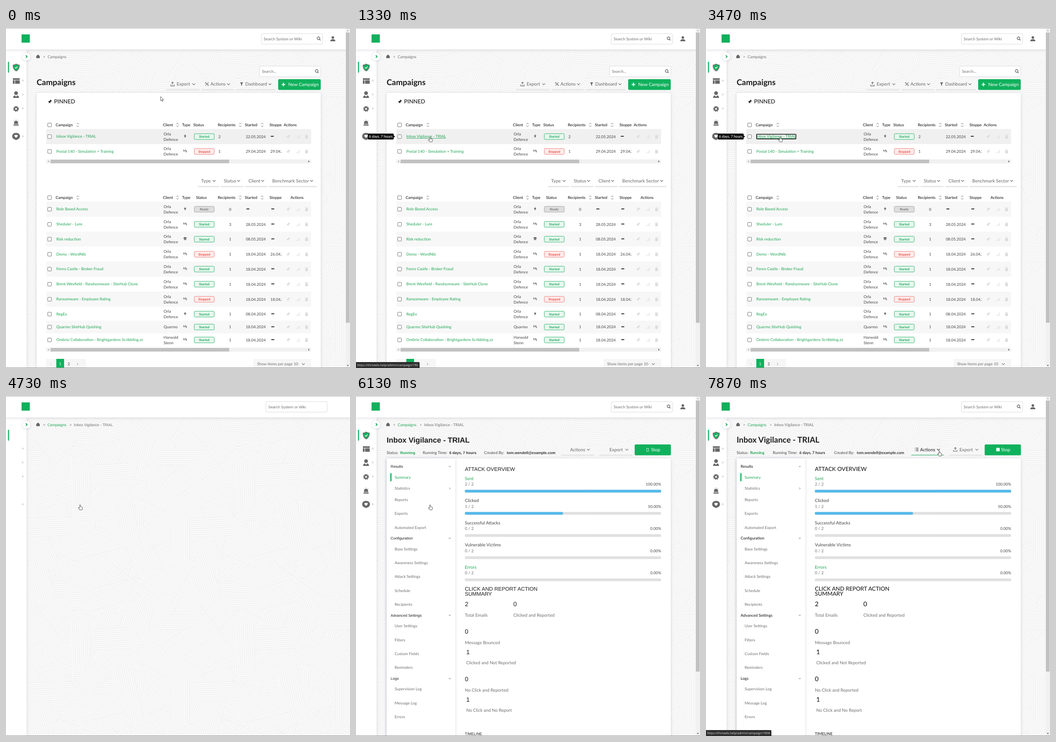
These frames come from a looping animation (752 px wide and 744 px high, 8000 ms). An HTML page with a canvas:

```html
<!DOCTYPE html>
<html lang="en">
<head>
<meta charset="utf-8">
<title>Campaigns</title>
<style>
html,body{margin:0;width:100%;height:100%;overflow:hidden;background:#f9f9f9}
canvas,svg{position:absolute;left:0;top:0;width:752px;height:744px;display:block}
text{font:8.55px Lato,sans-serif;fill:#444;text-rendering:geometricPrecision;white-space:pre}
.ln{fill:none;stroke:currentColor;stroke-width:1}
.m{font-weight:500;fill:#1c1c1c}
.h{font-size:17.5px;font-weight:700;fill:#1d1d1d}
.b{font-size:8.5px;font-weight:700;fill:#333}
.cap{font-size:12.3px;font-weight:500;fill:#1c1c1c}
.num{font-size:14px;font-weight:500;fill:#1c1c1c}
.t9{font-size:9.65px}
.t10{font-size:10px;fill:currentColor}
.tag{font-size:7px;font-weight:700}
.g{fill:#1da553}
.l{fill:#6e6e6e}
.w{fill:#fff}
.mid{text-anchor:middle}
.end{text-anchor:end}
.url{font:6.7px "Open Sans","Noto Sans",sans-serif;fill:#e3e3e3}
.raw .f{font:8.15px "Liberation Sans",Arial,sans-serif}
.half .m{font:8.15px "Liberation Sans",Arial,sans-serif}
.half .b{font:700 8.15px "Liberation Sans",Arial,sans-serif}
.half .h{font:700 16.3px "Liberation Sans",Arial,sans-serif}
.half .cap{font:11.6px "Liberation Sans",Arial,sans-serif}
.half .num{font:13.5px "Liberation Sans",Arial,sans-serif}
.sh{filter:drop-shadow(0 1px 3px rgba(40,40,90,.17))}
</style>
</head>
<body>
<canvas id="bg" width="752" height="744"></canvas>
<svg id="ui" viewBox="0 0 752 744"></svg>
<script>
const GREEN = '#10b15c', GREY = '#686868', NAME = 'Inbox Vigilance - TRIAL';
const $ = id => document.getElementById(id);

// Hatched paper, repeating every 360 px
function paper() {
  const c = $('bg').getContext('2d'), P = 360, cell = 40;
  let seed = 11;
  const rnd = () => (seed = seed * 16807 % 2147483647) / 2147483647;
  const list = [];
  for (let i = 0; i < 81; i++)
    list.push([(i * 4 % 9 + rnd()) * cell, ((i / 9 | 0) * 2 % 9 + rnd()) * cell, 90 + rnd() * 40, 44 + rnd() * 10, rnd() * 180]);
  list.push([25, 135, 95, 32, 0], [350, 225, 110, 50, 28], [165, 32, 120, 46, 22],
    [230, 75, 90, 45, -14], [30, 180, 90, 45, -32], [163, 190, 100, 40, 88],
    [20, 310, 100, 42, 90], [230, 172, 90, 46, -3], [95, 287, 95, 42, -2]);
  c.fillStyle = '#f9f9f9';
  c.fillRect(0, 0, 752, 744);
  c.strokeStyle = '#eee';
  for (const [x, y, w, h, a] of list)
    for (let ox = -P; ox < 1100; ox += P)
      for (let oy = -P; oy < 1100; oy += P) {
        c.save();
        c.translate(x + ox, y + oy);
        c.rotate(a * Math.PI / 180);
        c.fillRect(-w / 2, -h / 2, w, h);
        c.beginPath();
        for (let v = -h / 2; v <= h / 2; v += 4.5) { c.moveTo(-w / 2, v); c.lineTo(w / 2, v); }
        c.stroke();
        c.restore();
      }
}

const T = (x, y, s, cls = '', a = '') => `<text x="${x}" y="${y}" class="${cls}" ${a}>${s}</text>`;
const R = (x, y, w, h, fill, a = '') => `<rect x="${x}" y="${y}" width="${w}" height="${h}" fill="${fill}" ${a}/>`;
const S = (d, x, y, a = '') => `<path d="${d}" transform="translate(${x} ${y})" ${a}/>`;
const G = (id, s, a = '') => `<g id="${id}" ${a}>${s}</g>`;
const line = (d, x, y, col, w = 1) => S(d, x, y, `class="ln" style="color:${col};stroke-width:${w}"`);
const down = (x, y, col = 'currentColor', w = 1.1, k = 1) => line(`M${-3 * k} ${-1.5 * k}L0 ${1.5 * k} ${3 * k} ${-1.5 * k}`, x, y, col, w);
const right = (x, y, col = '#888') => line('M-1-2 1 0-1 2', x, y, col, .9);
const sort = (x, y) => line('M-2.5-1.5 0-4 2.5-1.5M-2.5 1.5 0 4 2.5 1.5', x, y, '#666', .9);
const box = y => R(91.2, y - 4, 8.2, 8.2, '#fff', 'rx="1" stroke="#666" stroke-width=".9"');
const lens = (x, y) => line('M2 2 4 4M2.6-.4A3-3 0 1 1 2.6-.6', x, y, '#555', 1.2);

const ICON = {
  out: 'M0 1.5V-4M-2.2-2 0-4.2 2.2-2M-4 1.2V4H4V1.2',
  tools: 'M-3.5-3.5 3.5 3.5M3.5-3.5-3.5 3.5M-4-1.5-2-3.8M2 3.8 4 1.8',
  list: 'M-4-3H-3M-1.5-3H4M-4 0H-3M-1.5 0H4M-4 3H-3M-1.5 3H4',
  funnel: 'M-3.5-3.5H3.5L1 0V4L-1 2.5V0Z',
  pin: 'M1-4.5 4.5-1 3.6-.4 2.8-.8 .9 1.2 .8 3 0 3.7-1.7 2-4.5 4.5-2 1.6-3.7 0-3-.8-1.2-.9 .8-2.8 .4-3.6Z',
  bars: 'M-4 2.5H-3V4H-4ZM-1.6 .8H-.6V4H-1.6ZM.8-1.2H1.8V4H.8ZM3.2-3.5H4.2V4H3.2Z',
  bin: 'M-3.5-3.5H-1L-.6-4.3H.6L1-3.5H3.5V-2.5H-3.5ZM-3-1.8H3V4.2H-3Z',
  bolt: 'M1-4.5-2.6 .8H-.3L-1 4.5 2.7-1H.4Z',
  hook: 'M-3-3V1H-.8M-4-1H3.8M1-3V.8H3.6V2.4H1.4',
  cap: 'M-4.6-1.6 0-3.6 4.6-1.6 0 .5ZM-2.6 .3V2.3Q0 3.8 2.6 2.3V.3L0 1.5Z',
  home: 'M0-4 3.8-.4V4H-3.8V-.4Z'
};

function btn(x, w, y, icon, ix, label, tx, cx) {
  const draw = !icon ? '' : icon === 'funnel' ? S(ICON.funnel, ix, y, 'fill="currentColor"')
    : line(ICON[icon], ix, y, 'currentColor', 1.1);
  return R(x, y + 12.4, w, 2, '#efefef') + R(x, y + 11.7, w, 1, 'var(--u,#d6d6d6)')
    + `<g class="ico">${draw}</g>` + T(tx, y + 3.6, label, 't10') + down(cx, y + .3);
}

const TAGS = {
  Started: ['#e7f7ee', '#35b873', '#1da55c'],
  Stopped: ['#fdeceb', '#f0827d', '#e5504a'],
  Ready: ['#dedede', '#a8a8a8', '#777']
};

function tag(y, s) {
  const [fill, edge, ink] = TAGS[s];
  return R(411.6, y - 6.2, 43.6, 12.6, fill, `rx="2" stroke="${edge}"`)
    + T(433.4, y + 2.5, s, 'tag mid', `style="fill:${ink}"`);
}

function row(y, name, kind, state, n, from, to, wide, bg, client = 'Orla Defence') {
  const words = client.split(' '), h = y > 640 ? 28 : 33;
  let s = bg ? R(88, y - h / 2, 579, h, bg) : '';
  s += box(y) + T(110, y + 2.8, name, 'g');
  s += words.length < 2 ? T(344.5, y + 3, client) : T(344.5, y - 3, words[0]) + T(344.5, y + 9, words[1]);
  s += kind === 'hook' ? line(ICON.hook, 391.5, y - 1, '#666', .9) : S(ICON[kind], 391.5, y - 1, 'fill="#555"');
  s += tag(y, state) + (wide ? T(490, y + 3, n, 'mid') : T(464.3, y + 3, n));
  s += from ? T(546, y + 3, from, 'mid') : R(525.5, y - 1.5, 6.5, 1.8, '#222');
  s += to ? T(578, y + 3, to, '', 'clip-path="url(#cut)"') : R(wide ? 580 : 578.8, y - 1.5, 6.5, 1.8, '#222');
  return s + ['pin', 'bars', 'bin'].map((k, i) => S(ICON[k], [617, 638, 657][i], y, 'fill="#dcdcdc"')).join('');
}

function head(y, st, act) {
  const cols = [[108.5, 'Campaign'], [343, 'Client'], [385, 'Type'], [st, 'Status'], [463, 'Recipients'], [522, 'Started'], [act, 'Actions']];
  return box(y) + cols.map(([x, s]) => T(x, y + 3, s, 'm')).join('')
    + T(576, y + 3, 'Stopped', 'm', 'clip-path="url(#cut)"')
    + [157, 375, 512, 560].map(x => sort(x, y)).join('');
}

const slider = y => R(88, y, 579, 9, '#f1f1f1') + R(97.5, y + .6, 390.5, 7.8, '#c1c1c1')
  + S('M1-2V2L-1.5 0Z', 93, y + 4.5, 'fill="#a3a3a3"') + S('M-1-2V2L1.5 0Z', 662, y + 4.5, 'fill="#444"');

function shell() {
  const side = S('M0-8Q4-5.6 7.6-5.6 8.4 4.5 0 9-8.4 4.5-7.6-5.6-4-5.6 0-8Z', 22.3, 86, 'fill="#777"')
    + S('M0-6.3Q3-4.4 6-4.3 6.4 3.8 0 7.2-6.4 3.8-6-4.3-3-4.4 0-6.3Z', 22.3, 86, `fill="${GREEN}"`)
    + line('M-2.8 0-.6 2.2 3-1.8', 22.3, 86, '#fff', 1.4)
    + S('M-7.5-6H7.5V-2.6H-7.5ZM-7.5-1.5H-3.7V6H-7.5ZM-2.6-1.5H7.5V6H-2.6Z', 22.5, 116, `fill="${GREY}"`)
    + S('M0-7.5A3.9 3.9 0 0 1 0 .5 3.9 3.9 0 0 1 0-7.5M-6.5 7Q-6 1.6-2.5 1.4L0 4.5 2.5 1.4Q6 1.6 6.5 7Z', 22, 146, `fill="${GREY}"`)
    + `<g fill="none" stroke="${GREY}"><circle cx="22" cy="177" r="3.5" stroke-width="2.8"/><circle cx="22" cy="177" r="5.3" stroke-width="2" stroke-dasharray="2.3 1.86"/></g>`
    + S('M-4.5 3V.5A4.5 4.5 0 0 1 4.5 .5V3ZM-5.5 4H5.5V6.5H-5.5Z', 22, 207, `fill="${GREY}"`)
    + line('M0-7V-5.4M-4.8-5-3.7-4M4.8-5 3.7-4', 22, 207, GREY)
    + S('M0-7.5A7.5 7.2 0 0 1 2 7L0 8.8-2 7A7.5 7.2 0 0 1 0-7.5Z', 22, 237, `fill="${GREY}"`)
    + S('M0 3.4-3.4 0A1.9 1.9 0 0 1 0-2.3 1.9 1.9 0 0 1 3.4 0Z', 22, 237, 'fill="#fff"');
  return R(0, 47, 45, 697, '#fff', 'class="sh"') + R(0, 0, 752, 47, '#fff', 'class="sh"')
    + R(34, 14, 18, 18, GREEN) + R(4.3, 74, 2.3, 23.6, GREEN)
    + [115, 145.5, 176, 237].map(y => right(36.7, y)).join('') + G('side', side)
    + `<circle cx="44.5" cy="62.5" r="8.6" fill="#fff" class="sh"/>` + line('M-1.4-2.8 1.4 0-1.4 2.8', 44.7, 62.5, GREEN, 1.9)
    + G('find', R(558.2, 12.3, 134, 23, '#fff', 'rx="3" stroke="#dcdcdc"') + T(563.3, 26.5, 'Search System or Wiki', 'f l')
      + G('findIcons', lens(683.5, 23)
        + S('M0-5.6A2.8 2.8 0 0 1 0 0 2.8 2.8 0 0 1 0-5.6M-5.6 5.4Q-5.4 1 0 1 5.4 1 5.6 5.4Z', 714.5, 23.5, `fill="${GREY}"`)))
    + S(ICON.home, 70, 62, 'fill="#666"')
    + G('crumb1', T(81, 66, '&gt;', 'l') + T(91, 66, 'Campaigns', 'l'))
    + G('crumb2', T(81, 66, `<tspan>&gt;</tspan><tspan dx="5" class="g">Campaigns</tspan><tspan dx="7">&gt;</tspan><tspan dx="5">${NAME}</tspan>`, 'f l'));
}

function campaigns() {
  const D = '18.04.2024', dim = '#f7f7f7';
  const rows = [
    [396.5, 'Role Based Access', 'bolt', 'Ready', 0, '', ''],
    [429.5, 'Sheduler - Lure', 'hook', 'Started', 3, '28.05.2024', ''],
    [462, 'Risk reduction', 'cap', 'Started', 1, '08.05.2024', ''],
    [495, 'Demo - WordNib', 'hook', 'Stopped', 1, D, '26.04.2024'],
    [527.5, 'Fenro Castle - Broker Fraud', 'hook', 'Started', 1, D, ''],
    [560.5, 'Brent Wexfield - Randsomware - SiteHub Clone', 'hook', 'Started', 1, D, ''],
    [593.5, 'Ransomware - Employee Rating', 'hook', 'Stopped', 1, D, D],
    [626, 'RegEx', 'bolt', 'Started', 1, '08.04.2024', ''],
    [654.3, 'Quarmo SiteHub Quishing', 'hook', 'Started', 1, D, '', 'Quarmo'],
    [682.5, 'Ombrio Collaboration - Brightgardens Scribbling.zz', 'hook', 'Started', 1, D, '', 'Harwold Stenn']
  ];
  return R(554.2, 83.3, 134, 23.4, '#fff', 'rx="3" stroke="#dcdcdc"') + T(559.5, 98, 'Search...', 'l') + lens(679.5, 94.5)
    + T(67, 124.5, 'Campaigns', 'h')
    + `<g color="${GREY}">` + btn(350, 73, 122.6, 'out', 364, 'Export', 373, 410.5)
    + btn(428, 71, 122.6, 'tools', 439.3, 'Actions', 447, 486.5)
    + btn(503, 86, 122.6, 'funnel', 515, 'Dashboard', 523, 577) + '</g>'
    + R(595, 112, 93, 23.5, GREEN, 'rx="2.5"') + line('M-4 0H4M0-4V4', 606.5, 123.6, '#fff', 1.9)
    + T(617, 127.2, 'New Campaign', 't10', 'color="#fff" font-weight="500"')
    + R(67, 142, 621, 610, '#fff', 'rx="3" class="sh"')
    + S(ICON.pin, 96, 161, 'fill="#222"') + T(105, 165.4, 'PINNED', 'cap')
    + head(212, 409.5, 607)
    + row(237.5, NAME, 'bolt', 'Started', 2, '22.05.2024', '', false, '#f0f0f0')
    + row(270, 'Postal 140 - Simulation + Training', 'hook', 'Stopped', 1, '29.04.2024', '29.04.2024')
    + slider(287.5)
    + `<g color="${GREY}">` + btn(419, 47, 334.2, '', 0, 'Type', 426.5, 455) + btn(469, 50, 334.2, '', 0, 'Status', 476, 508.5)
    + btn(523, 49, 334.2, '', 0, 'Client', 530, 561) + btn(575, 104, 334.2, '', 0, 'Benchmark Sector', 582, 668) + '</g>'
    + head(371, 415.5, 622)
    + rows.map((r, i) => row(...r.slice(0, 7), true, i % 2 ? '' : dim, r[7])).join('')
    + slider(699.5)
    + R(88, 724, 87, 20, '#f6f6f6', 'rx="2"') + R(110, 724, 17, 20, GREEN)
    + right(156.5, 735.5, '#666') + line('M1-2-1 0 1 2', 98.5, 735.5, '#bbb', .8)
    + T(118.5, 738, '1', 'w mid') + T(137.3, 738, '2', 'mid')
    + R(541, 724, 126, 20, '#f6f6f6', 'rx="2"') + T(549, 738, 'Show items per page 10', 'l') + down(650, 735.3, GREY)
    + G('under', R(110, 241, 86.5, .8, '#1da553'))
    + G('focus', R(110.6, 232.4, 86, 10.4, 'none', 'rx="1" stroke="#111" stroke-width="1.5"'))
    + G('tip', R(26, 231, 56.5, 13, '#0d0d0d', 'rx="2"') + S('M0-2.5 3 0 0 2.5Z', 82.4, 237.5, 'fill="#0d0d0d"')
      + T(54.2, 240, '6 days, 7 hours', 'w mid', 'style="font-size:7.8px;font-weight:500"'))
    + G('title', R(167.5, 245.5, 79, 15, '#fff', 'stroke="#aaa" stroke-width=".8"')
      + T(207, 255.4, NAME, 'url mid', 'style="fill:#555;font-size:6.6px"'));
}

function detail() {
  const groups = [[157.3, 'Results'], [314.2, 'Configuration'], [482.8, 'Advanced Settings'], [621.2, 'Logs']];
  const items = [[205.2, 'Statistics'], [260, 'Exports'], [290.5, 'Automated Export'], [337.5, 'Base Settings'],
    [368, 'Awareness Settings'], [398.3, 'Attack Settings'], [428.7, 'Schedule'], [459, 'Recipients'], [506, 'User Settings'],
    [536.5, 'Filters'], [567, 'Custom Fields'], [597.4, 'Reminders'], [644.4, 'Supervision Log'], [674.7, 'Message Log'], [705, 'Errors']];
  const bars = [['Sent', 2], ['Clicked', 1], ['Successful Attacks', 0], ['Vulnerable Victims', 0], ['Errors', 0]];
  const sums = [[238, 460, 2, 'Total Emails'], [344, 460, 0, 'Clicked and Reported'], [238, 520, 0, 'Message Bounced'],
    [241, 564.6, 1, 'Clicked and Not Reported'], [238, 624.4, 0, 'No Click and Reported'], [241, 668.7, 1, 'No Click and No Report']];
  return T(67, 101.5, NAME, 'h') + T(67, 127, 'Status:') + T(96.5, 127, 'Running', 'b', 'style="fill:#1da553"')
    + T(146, 127, 'Running Time:') + T(204, 127, '6 days, 7 hours', 'b') + T(280, 127, 'Created By:')
    + T(329.5, 127, 'tom.wendell@example.com', 'b')
    + G('act', btn(449, 71, 117, 'list', 460.5, 'Actions', 468, 508))
    + `<g color="${GREY}">` + btn(532, 72, 117, 'out', 545, 'Export', 554, 592) + '</g>'
    + R(609.2, 106, 79.2, 23.8, GREEN, 'rx="2.5"') + T(645, 121.2, 'Stop', 't10', 'color="#fff" font-weight="500"')
    + `<g class="ico">${R(634.5, 113.5, 7.5, 7.5, '#fff', 'rx=".8"')}</g>`
    + G('noIcon', R(635.5, 114.5, 4, 6.5, 'none', 'stroke="#fff" stroke-width=".7"'))
    + R(67, 136.5, 621, 620, '#fff', 'rx="3" class="sh"') + R(67, 136.5, 150, 620, '#fff', 'rx="3" class="sh"')
    + groups.map(([y, s]) => T(75.8, y, s, 'm') + down(205, y - 3, '#666', 1, .7)).join('')
    + items.map(([y, s]) => T(84.5, y, s, 'l')).join('') + right(205, 202.3, '#666')
    + T(84.5, 180.6, 'Summary', 'g') + R(75, 169, 2.6, 17.5, GREEN) + T(84.5, 229.7, 'Reports', 'l', 'id="rep"')
    + T(238, 163.8, 'ATTACK OVERVIEW', 'cap')
    + bars.map(([s, n], i) => {
      const y = 208.3 + i * 48.5;
      return T(238, y - 24.5, s, 't9 ' + (i % 4 ? '' : 'g')) + T(238, y - 12, n + ' / 2', 'l', 'style="font-size:9px"')
        + T(667, y - 12, (n * 50).toFixed(2) + '%', 'end') + R(238, y - 3, 429, 6, '#e0e0e0', 'rx="2"')
        + (n ? R(238, y - 3, 214.5 * n, 6, '#56b9ea', 'rx="2"') : '');
    }).join('')
    + T(238, 426.2, 'CLICK AND REPORT ACTION', 'cap') + T(238, 437.2, 'SUMMARY', 'cap')
    + sums.map(([x, y, n, s]) => T(x, y, n, 'num') + T(x, y + 22.5, s, 't9 l')).join('')
    + T(238, 742, 'TIMELINE', 'm');
}

const status = (id, w, end) => G(id, `<path d="M0 731H${w - 2}Q${w} 731 ${w} 733V744H0Z" fill="#2e2e2e"/>`
  + T(2.5, 740, 'https://thrivedx.help/admin/campaign/190' + end, 'url'));

paper();
$('ui').innerHTML = '<defs><clipPath id="cut"><rect x="570" y="150" width="33" height="594"/></clipPath></defs>'
  + shell() + G('p1', campaigns()) + G('p2', detail())
  + G('bar', R(742.6, 0, 9.4, 744, '#f1f1f1') + R(743, 10, 8.2, 635, '#c1c1c1', 'id="thumb"')
    + S('M-2 1H2L0-1.5Z', 747.3, 5.5, 'fill="#a3a3a3"') + S('M-2-1H2L0 1.5Z', 747.3, 738.5, 'fill="#444"'))
  + R(0, 0, 752, .8, '#a5a5a5') + R(0, 743, 752, 1, '#969696')
  + status('url1', 139, '') + status('url2', 143, '#')
  + G('cur', `<g fill="#fff" stroke="#333" stroke-width=".8" stroke-linejoin="round">
    <path id="arrow" d="M0 0V9.4L2.2 7.4 3.7 10.5 5.1 9.9 3.7 6.9H6.6Z"/>
    <path id="hand" d="M-1 .8Q0-.8 1 .8V4.2L4.6 5.2Q5.5 5.6 5.3 7L4.3 11.2H-1L-3.9 7.2Q-3.9 5.8-2.6 6.2L-1 7.6Z"/></g>`);

const smooth = p => p * p * (3 - 2 * p);
const ramp = (t, a, b) => Math.min(1, Math.max(0, (t - a) / (b - a)));
const step = (t, t0) => t < t0 ? 0 : Math.min(1, (Math.floor((t - t0 + 5) / 66.667) + 1) / 13);
const show = (id, v) => $(id).style.display = v ? '' : 'none';
const within = (t, a, b) => t >= a && t < b;

function pointer(t) {
  if (t < 6670) {
    const e = smooth(step(t, 270));
    return [338 - 176 * e, 150 + 88 * e];
  }
  const p = step(t, 6670);
  return [162 + 348 * smooth(p ** .75), 238 - 118 * smooth(p ** .95)];
}

function draw(t) {
  const first = t < 4730, last = t >= 6130, blank = !first && !last;
  const cls = (blank && t < 5800 ? 'raw ' : '') + (within(t, 6130, 6400) ? 'half' : '');
  if ($('ui').getAttribute('class') !== cls) $('ui').setAttribute('class', cls);
  show('p1', first);
  show('p2', last);
  show('crumb1', first);
  show('crumb2', !first);
  show('bar', !blank);
  show('side', !within(t, 4730, 5070));
  show('findIcons', !within(t, 4730, 5070));
  $('find').setAttribute('transform', `translate(${blank ? 10 : 0} 0)`);
  $('thumb').setAttribute('height', first ? 635 : 593);

  show('under', t >= 1000);
  show('focus', t >= 2130);
  show('title', within(t, 1800, 2130));
  $('tip').style.opacity = ramp(t, 940, 1200);
  $('url1').style.opacity = first ? ramp(t, 1070, 1330) * (1 - ramp(t, 3270, 3470)) : 0;
  $('url2').style.opacity = ramp(t, 7730, 7870);

  const [x, y] = pointer(t), hover = t >= 7530;
  $('p2').querySelectorAll('.ico').forEach(e => e.style.display = t >= 6670 ? '' : 'none');
  show('noIcon', t < 6670);
  $('rep').style.fill = t >= 6670 && x < 217 ? '#1da553' : '';
  $('act').style.color = hover ? '#1c1c1c' : GREY;
  $('act').style.setProperty('--u', hover ? GREEN : '#d6d6d6');

  const hand = within(t, 1000, 2470) || within(t, 3400, 6670) || hover;
  show('hand', hand);
  show('arrow', !hand);
  $('cur').setAttribute('transform', `translate(${x.toFixed(1)} ${y.toFixed(1)})`);
}

const begin = performance.now();
function tick() {
  draw((performance.now() - begin) % 8000);
  requestAnimationFrame(tick);
}
tick();
</script>
</body>
</html>
```
